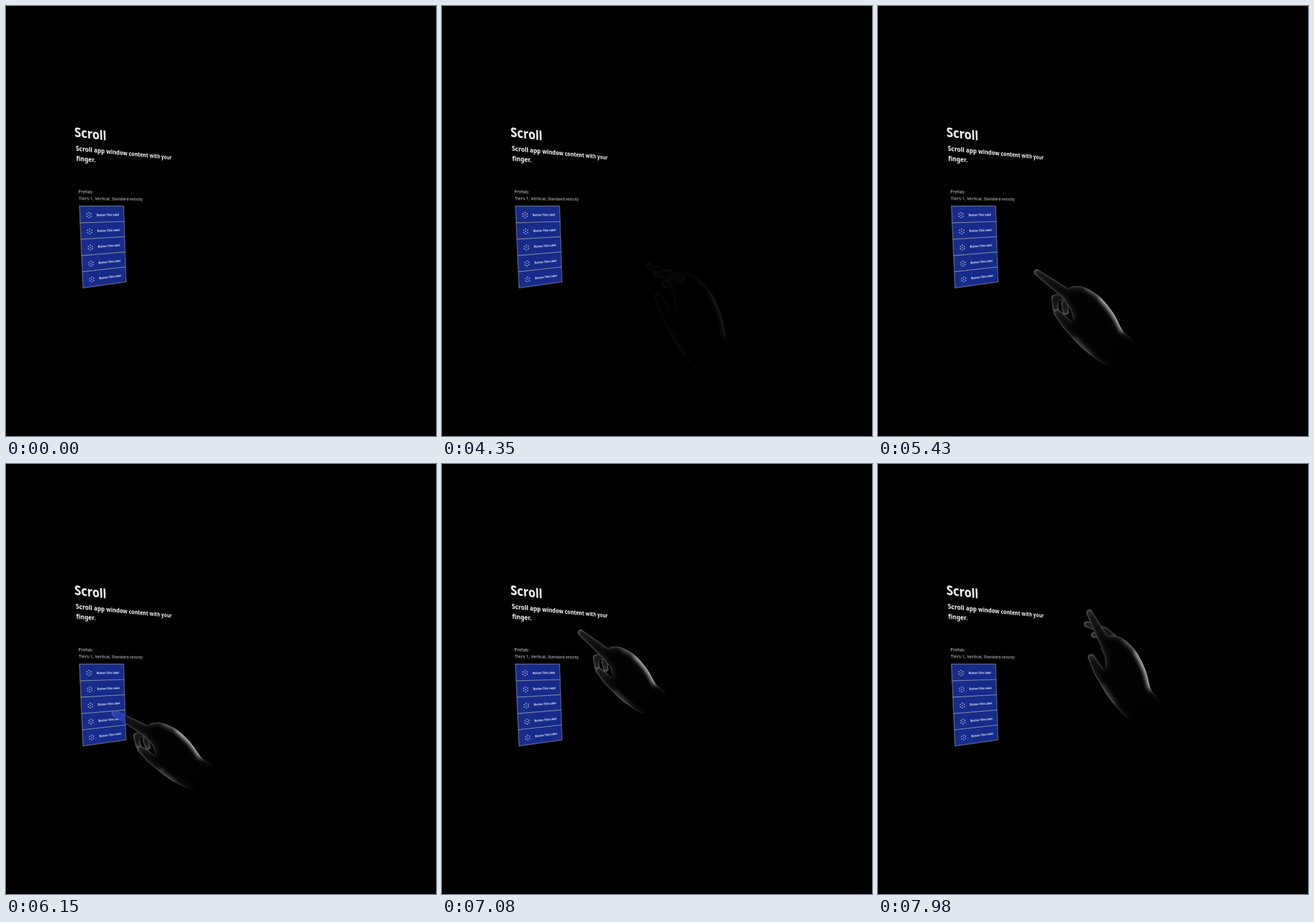
Recreate the animation shown at these times as an HTML page with a canvas. Size 720 by 720 pixels, loop 8 s.

```html
<!DOCTYPE html>
<html lang="en">
<head>
<meta charset="utf-8">
<title>Scroll</title>
<style>
  html, body { margin: 0; width: 100%; height: 100%; overflow: hidden; background: #000; }
  canvas { position: absolute; left: 0; top: 0; }
  /* Maps the flat panel (82 x 137 units) into its perspective quad. */
  #plane {
    position: absolute; left: 0; top: 0; overflow: visible; transform-origin: 0 0;
    transform: matrix3d(1.096, .3293, 0, .000983, .0657, 1.0803, 0, .00017, 0, 0, 1, 0, 123, 335, 0, 1);
    font-family: "Noto Sans", "Open Sans", sans-serif; fill: #fff;
  }
  .heading { font-weight: 600; }
  .caption { font-size: 7.8px; font-weight: 500; fill: #dcdcdc; }
  .label { font-size: 4.8px; font-weight: 600; fill: #e4e8f8; }
</style>
</head>
<body>
<svg id="plane" width="1" height="1">
  <text class="heading" x="-3" y="-111" font-size="20.5">Scroll</text>
  <text class="heading" x="-2" y="-89.3" font-size="10.5">Scroll app window content with your</text>
  <text class="heading" x="-2" y="-72.8" font-size="10.5">finger.</text>
  <text class="caption" x="-.8" y="-21">Prefab:</text>
  <text class="caption" x="-.5" y="-10">Tiers 1, Vertical, Standard velocity</text>
  <g id="rows"></g>
</svg>
<canvas id="stage" width="720" height="720"></canvas>
<script>
const SIZE = 720, LOOP = 8000, STEP = 30, HAND_IN = 4350, FADE_IN = 600;
const ROW_HEIGHT = 27.4;
const PANEL_QUAD = new Path2D('M123 335L197 335L201 462L129 472Z');

const range = n => [...Array(n).keys()];
const lerp = (a, b, k) => a + (b - a) * k;
const mix = (a, b, k) => a.map((v, i) => lerp(v, b[i], k));
const clamp = x => Math.min(1, Math.max(0, x));

// Panel rows with a dashed cube icon.
const corners = range(6).map(i => {
  const angle = Math.PI / 6 + i * Math.PI / 3;
  return [16 + 4.2 * Math.cos(angle), 15 + 4.2 * Math.sin(angle)];
});
const dots = [...corners, [16, 15]]
  .map(([x, y]) => `<circle cx="${x}" cy="${y}" r=".8"/>`).join('');
document.getElementById('rows').innerHTML = range(5).map(i => `
  <g transform="translate(0 ${i * ROW_HEIGHT})">
    <rect width="82" height="${ROW_HEIGHT}" fill="#172b8a" stroke="#a9adb4" stroke-width=".8"/>
    <polygon points="${corners.join(' ')}" fill="none" stroke="#cfd6f2" stroke-width=".4" stroke-dasharray="1.2 1"/>
    ${dots}
    <text class="label" x="29.8" y="16.7">Button Title Label</text>
  </g>`).join('');

// One hand model. Coordinates run from wrist (0) to index knuckle (1), then sideways to the thumb.
const PALM = [
  [0, .18], [.29, .29], [.55, .29], [.72, .16], [.84, .095], [.97, .07], [1.04, -.06],
  [1, -.15], [.9, -.22], [.7, -.27], [.45, -.255], [.22, -.195], [0, -.18]];
const THUMB = [[.45, .2], [.72, .245], [.92, .24]], THUMB_RADII = [.11, .066, .042];
const FINGERS = [
  { bent: [[.96, 0], [.94, .1], [.86, .155]], open: [[.95, -.1], [1.06, -.08], [1.14, .07]] },
  { bent: [[.98, 0], [1.07, .14], [.97, .22]], open: [[1, -.11], [1.12, -.07], [1.3, .08]] }
];

const POSES = [
  { time: 4350, wrist: [465, 600], knuckle: [390, 458], tip: [347, 435], bend: .5 },
  { time: 5130, wrist: [458, 578], knuckle: [373, 457], tip: [323, 427], bend: .85 },
  { time: 5430, wrist: [411, 585], knuckle: [317, 483], tip: [266, 446], bend: 1 },
  { time: 5940, wrist: [350, 550], knuckle: [255, 463], tip: [202, 433], bend: 1 },
  { time: 6240, wrist: [325, 517], knuckle: [228, 441], tip: [174, 411], bend: 1 },
  { time: 6750, wrist: [343, 436], knuckle: [243, 377], tip: [190, 351], bend: 1 },
  { time: 7410, wrist: [377, 370], knuckle: [308, 260], tip: [275, 214], bend: 1 },
  { time: 7980, wrist: [449, 416], knuckle: [380, 298], tip: [354, 249], bend: 0 }
];

function poseAt(t) {
  const next = Math.max(1, POSES.findIndex(p => p.time >= t));
  const a = POSES[next - 1], b = POSES[next], k = (t - a.time) / (b.time - a.time);
  return {
    wrist: mix(a.wrist, b.wrist, k),
    knuckle: mix(a.knuckle, b.knuckle, k),
    tip: mix(a.tip, b.tip, k),
    bend: lerp(a.bend, b.bend, k)
  };
}

// Catmull-Rom curve through the points.
function smooth(points, closed) {
  const path = new Path2D(), n = points.length;
  const at = i => points[closed ? (i + n) % n : Math.min(n - 1, Math.max(0, i))];
  path.moveTo(...points[0]);
  for (let i = 0; i < (closed ? n : n - 1); i++) {
    const [a, b, c, d] = [at(i - 1), at(i), at(i + 1), at(i + 2)];
    path.bezierCurveTo(b[0] + (c[0] - a[0]) / 6, b[1] + (c[1] - a[1]) / 6,
      c[0] - (d[0] - b[0]) / 6, c[1] - (d[1] - b[1]) / 6, ...c);
  }
  return path;
}

// Adds tapered, round-ended segments along the joints.
function addLimb(path, joints, radii) {
  for (let i = 1; i < joints.length; i++) {
    const [a, b] = [joints[i - 1], joints[i]], [ra, rb] = [radii[i - 1], radii[i]];
    const dx = b[0] - a[0], dy = b[1] - a[1];
    const angle = Math.atan2(dy, dx), open = Math.acos((ra - rb) / Math.hypot(dx, dy));
    path.moveTo(a[0] + ra * Math.cos(angle + open), a[1] + ra * Math.sin(angle + open));
    path.arc(...a, ra, angle + open, angle - open + 2 * Math.PI);
    path.arc(...b, rb, angle - open, angle + open);
    path.closePath();
  }
}

const stage = document.getElementById('stage').getContext('2d');
const layer = new OffscreenCanvas(SIZE, SIZE).getContext('2d');
layer.lineCap = 'round';

function blurred(blur, alpha, draw) {
  layer.filter = `blur(${blur}px)`;
  layer.globalAlpha = alpha;
  draw();
  layer.filter = 'none';
  layer.globalAlpha = 1;
}

// Fills a shape black with a rim of light along its inner edge.
function paintRim(path) {
  layer.globalCompositeOperation = 'source-over';
  layer.clearRect(0, 0, SIZE, SIZE);
  layer.fillStyle = '#fff';
  layer.fill(path);
  layer.globalCompositeOperation = 'source-atop';
  layer.fillStyle = '#000';
  blurred(6, .96, () => layer.fill(path));
  blurred(1.8, .75, () => layer.fill(path));
}

function paintGlow(points, width, alpha) {
  layer.strokeStyle = '#fff';
  layer.lineWidth = width;
  blurred(3.5, alpha, () => layer.stroke(smooth(points, false)));
}

function fadeWrist(wrist, knuckle) {
  const fade = layer.createLinearGradient(...wrist, ...mix(wrist, knuckle, .28));
  fade.addColorStop(0, '#000');
  fade.addColorStop(1, '#0000');
  layer.globalCompositeOperation = 'destination-out';
  layer.fillStyle = fade;
  layer.fillRect(0, 0, SIZE, SIZE);
}

function showLayer(alpha) {
  stage.globalAlpha = alpha;
  stage.drawImage(layer.canvas, 0, 0);
  stage.globalAlpha = 1;
}

function drawHand({ wrist, knuckle, tip, bend }, alpha) {
  const dx = knuckle[0] - wrist[0], dy = knuckle[1] - wrist[1], length = Math.hypot(dx, dy);
  const place = ([along, side]) =>
    [wrist[0] + along * dx + side * dy, wrist[1] + along * dy - side * dx];

  for (const finger of FINGERS) {
    const path = new Path2D();
    const joints = finger.open.map((p, i) => place(mix(p, finger.bent[i], bend)));
    addLimb(path, joints, [.045, .042, .036].map(r => r * length));
    paintRim(path);
    showLayer(alpha);
  }

  const palm = PALM.map(place), body = smooth(palm, true);
  addLimb(body, THUMB.map(place), THUMB_RADII.map(r => r * length));
  addLimb(body, [knuckle, tip], [9.5, 5]);
  paintRim(body);
  paintGlow(palm.slice(8, 12), 4, .45);
  paintGlow(palm.slice(9, 12), 5, .8);
  paintGlow(palm.slice(1, 3), 3, .35);
  fadeWrist(wrist, knuckle);
  showLayer(alpha);

  // The panel shines through the finger.
  stage.save();
  stage.clip(body);
  stage.globalCompositeOperation = 'lighten';
  stage.fillStyle = '#2440b4';
  stage.fill(PANEL_QUAD);
  stage.restore();
}

function frame(now) {
  const t = Math.floor(now % LOOP / STEP) * STEP;
  stage.clearRect(0, 0, SIZE, SIZE);
  if (t >= HAND_IN) drawHand(poseAt(t), lerp(.15, 1, clamp((t - HAND_IN) / FADE_IN)));
  requestAnimationFrame(frame);
}
requestAnimationFrame(frame);
</script>
</body>
</html>
```
